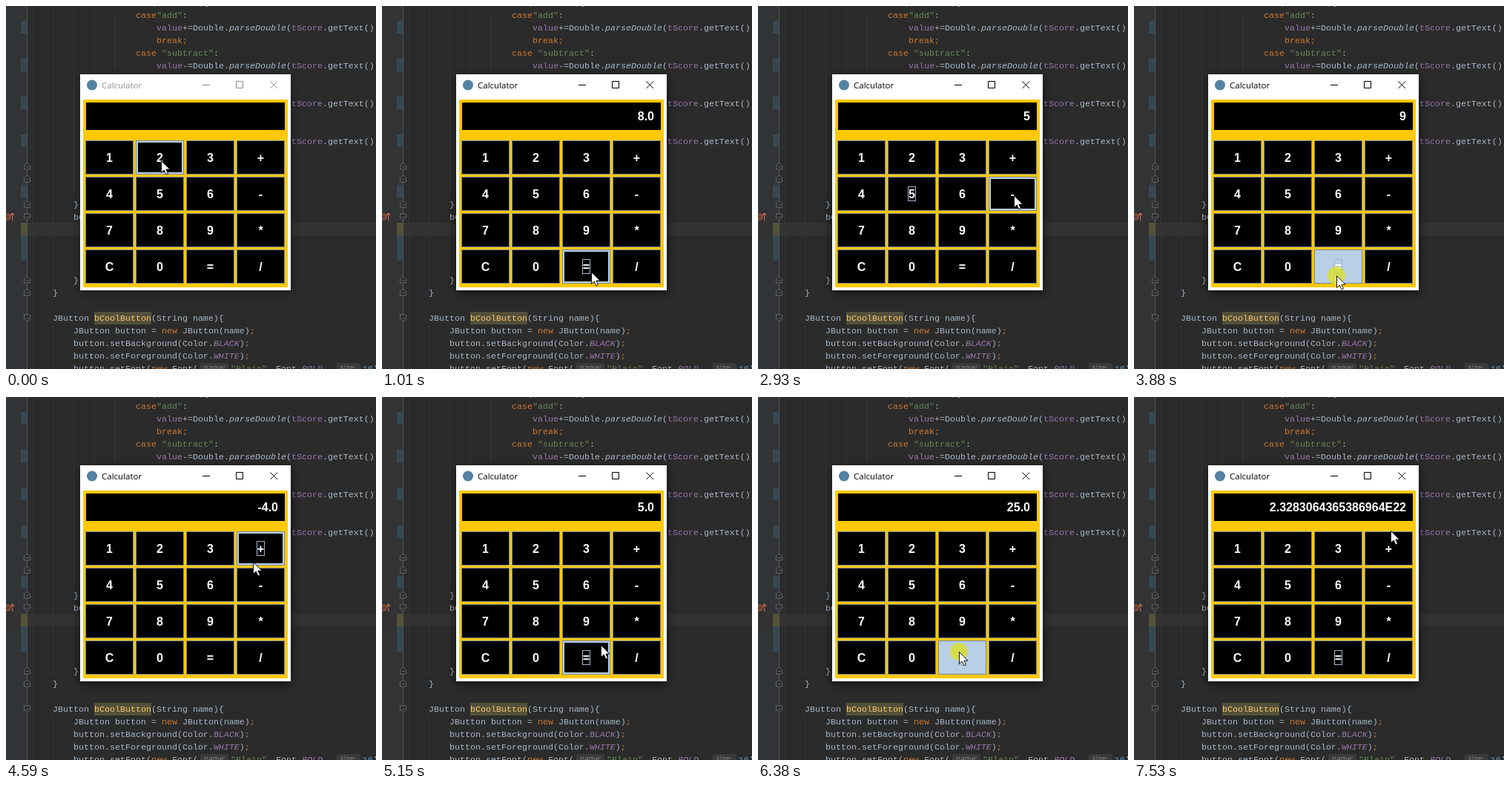
An HTML page for the animation above (7.58 s loop, 499 by 489 pixels).

```html
<!DOCTYPE html>
<html lang="en">
<head>
<meta charset="utf-8">
<title>Calculator</title>
<style>
html, body { margin: 0; width: 100%; height: 100%; overflow: hidden; background: #2b2b2b; }
svg { display: block; width: 499px; height: 489px; }
text { white-space: pre; }
#code text { font: 11.667px "Liberation Mono", monospace; fill: #a9b7c6; }
#code .k { fill: #cc7832; }
#code .s { fill: #6a8759; }
#code .f { fill: #9876aa; }
#code .c { fill: #9876aa; font-style: italic; }
#code .i { font-style: italic; }
#code .d { fill: #ffc66d; }
#code .hint { font: 10px "Open Sans", sans-serif; fill: #868686; }
.key, #display { font: bold 16px "Liberation Sans", sans-serif; fill: #fff; }
#title { font: 11.5px "Open Sans", sans-serif; }
</style>
</head>
<body>
<svg viewBox="0 0 499 489" xmlns="http://www.w3.org/2000/svg">
  <defs>
    <filter id="blur" x="-20%" y="-20%" width="140%" height="140%"><feGaussianBlur stdDeviation="7"/></filter>
  </defs>
  <rect width="499" height="489" fill="#2b2b2b"/>
  <rect width="29" height="489" fill="#313335"/>
  <rect y="292" width="499" height="17" fill="#323232"/>
  <g id="gutter"></g>
  <g id="code"></g>
  <rect id="shadow" x="100" y="96" width="284" height="290" filter="url(#blur)"/>
  <rect x="100" y="92" width="284" height="291" fill="#fff"/>
  <circle cx="116" cy="106.500" r="7" fill="#5382a1"/>
  <text id="title" x="129" y="111">Calculator</text>
  <path id="controls" d="M265 106.500h10M310.500 101.500h9v9h-9zM356.500 101.500l9.500 9.500m0 -9.500l-9.500 9.500" fill="none"/>
  <rect x="104" y="126" width="276" height="253" fill="#ffc800"/>
  <rect x="108" y="130" width="268" height="37" fill="#000"/>
  <text id="display" x="367" y="154" text-anchor="end"></text>
  <g id="keys"></g>
  <g id="pointer">
    <circle id="spot" r="12" fill="#dfe11c" opacity=".75"/>
    <path d="M.5 .5v16l3.700 -3.500l2.700 6l2.600 -1.200l-2.600 -5.700h5.200z" fill="#fff" stroke="#000" stroke-width=".9"/>
  </g>
</svg>
<script>
const LOOP = 7580, TICK = 70;
const $ = id => document.getElementById(id);

function add(parent, tag, attrs, html = '') {
  const el = document.createElementNS('http://www.w3.org/2000/svg', tag);
  for (const name in attrs) el.setAttribute(name, attrs[name]);
  el.innerHTML = html;
  parent.appendChild(el);
  return el;
}

// ---- editor behind the window ----
const gutter = $('gutter'), code = $('code');
const rowTop = row => 3 + 17 * row;
const span = (cls, text) => `<tspan class="${cls}">${text}</tspan>`;
const k = text => span('k', text), s = text => span('s', text), f = text => span('f', text);
const c = text => span('c', text);
const line = (row, x, html) => add(code, 'text', { x, y: rowTop(row) + 13 }, html);

function mark(row, rows, fill) {
  add(gutter, 'rect', { x: 20, y: rowTop(row), width: 9, height: 17 * rows, fill });
}
for (const row of [1, 4, 7, 10, 14]) mark(row, 1, '#374752');
mark(18, 2, '#374752');
mark(17, 1, '#54523a');

const guides = [[35, 0, 489], [63, 0, 378], [63, 430, 489], [91, 0, 258], [119, 0, 92], [147, 4, 92]];
for (const [x, y1, y2] of guides)
  add(gutter, 'path', { d: `M${x + .5} ${y1}V${y2}`, stroke: '#353535' });
add(gutter, 'path', { d: 'M28.5 0V489', stroke: '#555' });

function fold(y, dir) {
  add(gutter, 'path', {
    d: `M24.5 ${y + 4 * dir}h8v${-5 * dir}l-4 ${-4 * dir}l-4 ${4 * dir}zM26.500 ${y + .5}h4`,
    fill: '#2b2b2b', stroke: '#686868'
  });
}
[216, 233, 267, 369, 386].forEach(y => fold(y, 1));
[284, 420].forEach(y => fold(y, -1));

add(gutter, 'circle', { cx: 2, cy: 284, r: 4, fill: '#6b3d35', stroke: '#b0604d' });
add(gutter, 'path', { d: 'M8.500 289v-10m-2.500 3l2.500 -3l2.500 3', fill: 'none', stroke: '#c4604d', 'stroke-width': 1.2 });

const update = op => f('value') + op + '=Double.' + span('i', 'parseDouble') + '(' + f('tScore') + '.getText())' + k(';');
const setter = (name, color) => `button.${name}(Color.${c(color)})` + k(';');

line(-1, 147, k('switch') + ' (function){');
line(0, 175, k('case') + s('"add"') + ':');
line(1, 203, update('+'));
line(2, 203, k('break;'));
line(3, 175, k('case ') + s('"subtract"') + ':');
line(4, 203, update('-'));
line(7, 203, update('*'));
line(10, 203, update('/'));
line(15, 91, '}');
line(16, 91, 'bC');
line(21, 91, '}');
line(22, 63, '}');
add(code, 'rect', { x: 119, y: rowTop(24) + 1, width: 77, height: 17, fill: '#52503a' });
line(24, 63, 'JButton ' + span('d', 'bCoolButton') + '(String name){');
line(25, 91, 'JButton button = ' + k('new') + ' JButton(name)' + k(';'));
line(26, 91, setter('setBackground', 'BLACK'));
line(27, 91, setter('setForeground', 'WHITE'));
line(28, 91, 'button.setFont(' + k('new') + ' Font(');
line(28, 303, s('"Plain"') + k(','));
line(28, 364, 'Font.' + c('BOLD') + k(','));
line(28, 481, '<tspan fill="#6897bb">16</tspan>)');
for (const [x, w, word] of [[262, 38, 'name:'], [446, 32, 'size:']]) {
  add(code, 'rect', { x, y: 481, width: w, height: 14, rx: 3, fill: '#3b3b3b' });
  add(code, 'text', { class: 'hint', x: x + 5, y: 491 }, word);
}

// ---- calculator keys ----
const keys = [...'123+456-789*C0=/'].map((name, i) => {
  const x = 107 + 68 * (i % 4), y = 181 + 49 * Math.floor(i / 4);
  const g = add($('keys'), 'g', { transform: `translate(${x} ${y})` });
  const face = add(g, 'rect', { x: .5, y: .5, width: 64, height: 45, stroke: '#7a8a99' });
  const glow = add(g, 'rect', { x: 2, y: 2, width: 61, height: 42, fill: 'none', stroke: '#b8cfe5', 'stroke-width': 2 });
  const label = add(g, 'text', { class: 'key', x: 32.5, y: 29, 'text-anchor': 'middle' }, name);
  const w = Math.round(label.getComputedTextLength() + 1);
  const ring = add(g, 'rect', { x: Math.round(32 - w / 2) + .5, y: 13.5, width: w, height: 19, fill: 'none', stroke: '#a3b8cc' });
  return { name, x, y, face, glow, ring };
});

// press time, release time, key
const clicks = [
  [70, 140, '2'], [330, 400, '+'], [640, 710, '='], [950, 1010, '='], [1190, 1260, '='],
  [1440, 1510, '='], [1620, 1690, '='], [1760, 1830, '='], [2010, 2080, '='], [2150, 2220, '='],
  [2430, 2500, 'C'], [2720, 2790, '5'], [3060, 3130, '-'], [3500, 3570, '9'], [3880, 3950, '='],
  [4480, 4550, '+'], [4770, 4840, '9'], [5080, 5150, '='], [5290, 5360, '*'], [5570, 5640, '5'],
  [6000, 6070, '='], [6380, 6450, '='], [6700, 6770, '='], [6840, 6910, '='], [7000, 7070, '=']
];

// arrive, leave, x, y
const stops = [
  [0, 140, 209, 208], [320, 400, 344, 206], [580, 840, 277, 364], [890, 2220, 282, 358],
  [2400, 2500, 138, 353], [2700, 2790, 209, 256], [2930, 3130, 345, 255], [3320, 3570, 276, 302],
  [3800, 4200, 273, 363], [4470, 4550, 344, 208], [4760, 4840, 276, 300], [5060, 5150, 276, 348],
  [5280, 5360, 345, 300], [5560, 5690, 208, 254], [5980, 7180, 271, 343], [7460, 7460, 345, 205],
  [7530, LOOP, 346, 180]
];

const maths = { '+': (a, b) => a + b, '-': (a, b) => a - b, '*': (a, b) => a * b, '/': (a, b) => a / b };

function format(n) {
  if (Math.abs(n) >= 1e7) return n.toExponential().replace('e+', 'E');
  return Number.isInteger(n) ? n + '.0' : String(n);
}

function readout(t) {
  let value = 0, op = '+', shown = '', fresh = true;
  for (const [, up, key] of clicks) {
    if (up > t) break;
    if (key === 'C') {
      value = 0; shown = ''; fresh = true;
    } else if (key === '=') {
      value = maths[op](value, Number(shown));
      shown = format(value); fresh = true;
    } else if (key in maths) {
      value = Number(shown); op = key; fresh = true;
    } else {
      shown = fresh ? key : shown + key; fresh = false;
    }
  }
  return shown;
}

// The pointer is sampled in ticks while it travels.
function pointerAt(t) {
  const next = stops.findIndex(stop => stop[0] > t);
  if (next < 0) return stops[stops.length - 1].slice(2);
  const [, leave, x, y] = stops[next - 1], [arrive, , nx, ny] = stops[next];
  if (t < leave) return [x, y];
  const u = Math.min(1, Math.floor((t - leave) / TICK + 1) * TICK / (arrive - leave + TICK));
  const e = u * u * (3 - 2 * u);
  return [Math.round(x + (nx - x) * e), Math.round(y + (ny - y) * e)];
}

const show = (el, on) => el.setAttribute('visibility', on ? 'visible' : 'hidden');

function render(t) {
  const [px, py] = pointerAt(t);
  const begun = clicks.filter(click => click[0] <= t);
  const last = begun[begun.length - 1];
  const focus = last ? last[2] : '';
  const down = !!last && t < last[1];
  const active = !!last;

  for (const key of keys) {
    const over = px >= key.x && px < key.x + 65 && py >= key.y && py < key.y + 46;
    const pressed = down && key.name === focus;
    key.face.setAttribute('fill', pressed ? '#b8cfe5' : '#000');
    show(key.glow, over && !pressed);
    show(key.ring, key.name === focus);
  }
  $('display').textContent = readout(t);
  $('title').setAttribute('fill', active ? '#000' : '#8c9490');
  $('controls').setAttribute('stroke', active ? '#000' : '#8a8a8a');
  $('shadow').setAttribute('opacity', active ? .6 : .35);
  $('pointer').setAttribute('transform', `translate(${px} ${py})`);
  show($('spot'), down);
}

const start = performance.now();
function frame() {
  render((performance.now() - start) % LOOP);
  requestAnimationFrame(frame);
}
frame();
</script>
</body>
</html>
```
